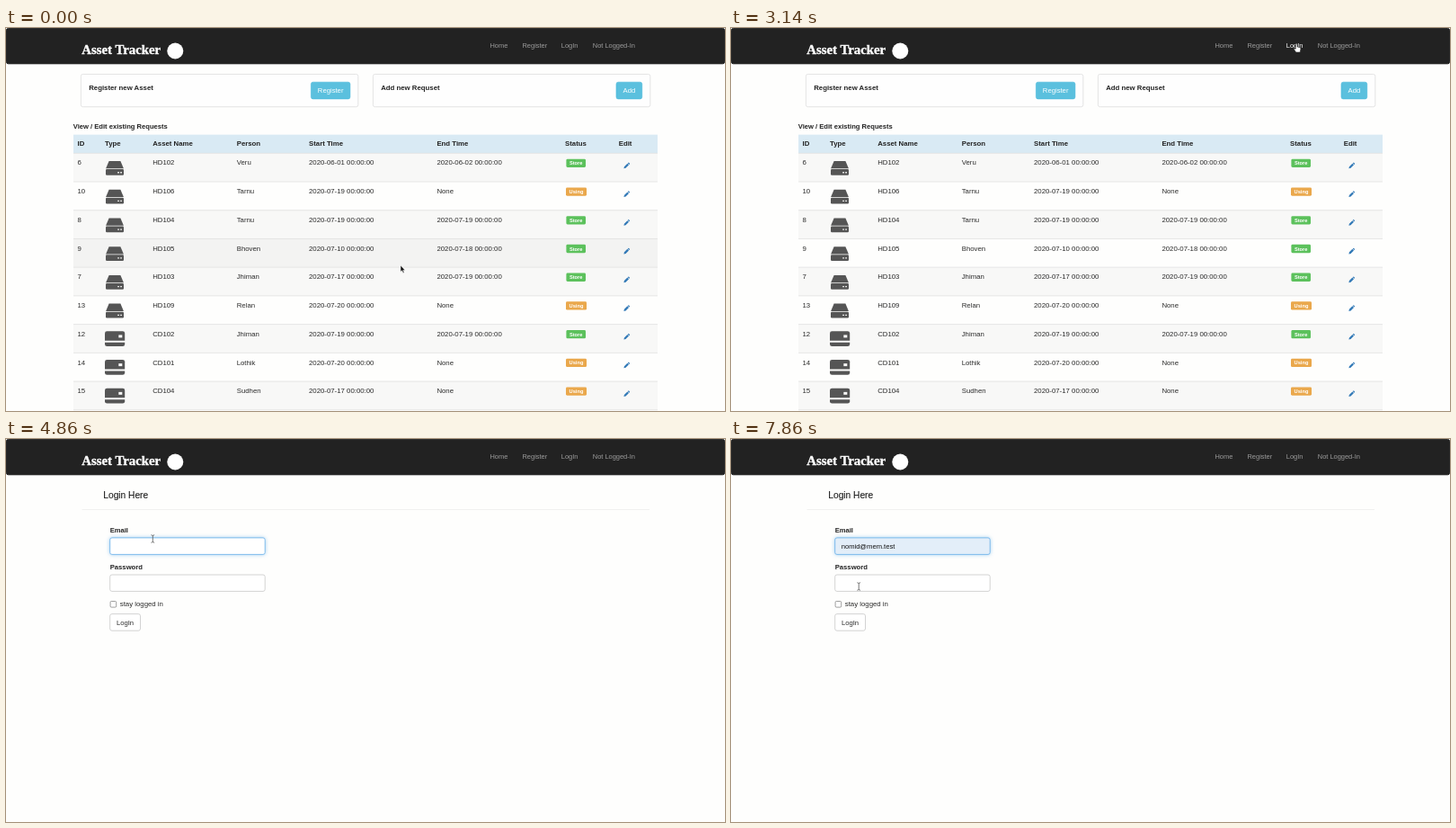
Animation, 800 px wide and 426 px high, one loop 8000 ms. Source, as an HTML page:

```html
<!DOCTYPE html>
<html lang="en">
<head>
<meta charset="utf-8">
<title>Asset Tracker</title>
<style>
  html, body { margin: 0; width: 100%; height: 100%; overflow: hidden; background: #fefefd; }
  svg { display: block; width: 100vw; height: 100vh; }
  text { font: 7.8px "Liberation Sans", Arial, sans-serif; fill: #2b2b2b; white-space: pre; }
  .bold { font-weight: 700; fill: #222; }
  .brand { font: 700 14.8px "Liberation Serif", "Noto Serif", serif; fill: #fff; stroke: #fff; stroke-width: .4; }
  .nav { font-size: 7.45px; fill: #9d9d9d; }
  .nav.on { fill: #fff; }
  .heading { font-size: 10.2px; fill: #222; stroke: #222; stroke-width: .15; }
  .badge { font-size: 5.7px; font-weight: 700; fill: #fff; text-anchor: middle; }
  .button { font-size: 7.7px; text-anchor: middle; }
  .light { fill: #fff; }
  .small { font-size: 7.6px; }
  .box { fill: #fefefe; stroke: #ddd; stroke-width: .8; }
  .input { fill: #fff; stroke: #c8c8c8; stroke-width: .8; }
  .input.focus { stroke: #66afe9; filter: drop-shadow(0 0 2px #66afe999); }
  .input.filled { fill: #e3eef9; }
  #typed { font-size: 7.6px; fill: #555; }
  #typed.filled { fill: #111; }
  .row { fill: #fefefd; }
  .row.odd { fill: #f8f8f7; }
  .row.hover { fill: #f3f3f2; }
</style>
</head>
<body>
<svg viewBox="0 0 800 426" preserveAspectRatio="none">
  <defs>
    <g id="hdd" fill="#555">
      <path d="M114.6 8.7h12.8l3.5 8.3h-19.8z"/>
      <rect x="111" y="17.8" width="20" height="6.7" rx="1.2"/>
      <path d="M124.2 20.8h1.7v1.3h-1.7zM127.2 20.8h1.7v1.3h-1.7z" fill="#f8f8f7"/>
    </g>
    <g id="card" fill="#555">
      <path d="M110 18.2v-8.2q0-2.4 2.4-2.4h17.4q2.4 0 2.4 2.4v8.2z"/>
      <path d="M110 20.2h22.2v2q0 2.2-2.4 2.2h-17.4q-2.4 0-2.4-2.2z"/>
      <rect x="125.3" y="11.8" width="4" height="3" fill="#f8f8f7"/>
    </g>
    <path id="pencil" d="M687.4 17l.5-2.1 3.5-3.5 1.6 1.6-3.5 3.5zM691.8 11l.5-.5q.4-.3.8 0l.8.8q.3.4 0 .8l-.5.5z" fill="#337ab7"/>
  </defs>
  <rect width="800" height="426" fill="#fefefd"/>
  <rect x=".4" y=".4" width="799.2" height="39.4" rx="2.2" fill="#222" stroke="#080808" stroke-width=".8"/>
  <text class="brand" x="84.3" y="29">Asset Tracker</text>
  <circle cx="188.3" cy="25.5" r="9" fill="#fff"/>
  <g id="nav"></g>
  <g id="list"></g>
  <g id="login">
    <text class="heading" x="108.3" y="65.8">Login Here</text>
    <path d="M84.5 78.5H716" stroke="#eee" stroke-width=".8"/>
    <text class="bold small" x="115.7" y="103.8">Email</text>
    <rect class="input" id="email" x="115.7" y="109.9" width="172.5" height="18.5" rx="2.2"/>
    <text id="typed" x="122.7" y="121.7"></text>
    <rect id="caret" y="114.5" width=".8" height="9.2" fill="#333"/>
    <text class="bold" style="font-size:7.7px" x="115.7" y="145.1">Password</text>
    <rect class="input" x="115.7" y="151" width="172.5" height="18.4" rx="2.2"/>
    <rect x="116.1" y="180.5" width="6.6" height="6.6" rx="1.2" fill="#fff" stroke="#767676" stroke-width=".7"/>
    <text x="126.8" y="186.4">stay logged in</text>
    <rect class="input" x="115.7" y="194.6" width="33.8" height="18.6" rx="2.2"/>
    <text class="button" x="132.5" y="206.7">LogIn</text>
  </g>
  <g id="cursor">
    <path class="arrow" d="M0 0v7.2l1.6-1.4 1.3 2.7 1.2-.6-1.3-2.5h2.2z" fill="#111" stroke="#fff" stroke-width=".5"/>
    <path class="hand" d="M-.9 .8q.9-1.3 1.8 0v3l3 .7q1 .3 .8 1.5l-.7 3.8h-4.6l-2.2-3.4q-.5-1.2 1.9-.4z" fill="#fff" stroke="#222" stroke-width=".6"/>
    <path class="beam" d="M-1.8-4.2q1.6 0 1.8 .9q.2-.9 1.8-.9M0-3.5v7M-1.8 4.2q1.6 0 1.8-.9q.2 .9 1.8 .9" fill="none" stroke="#555" stroke-width=".8"/>
  </g>
</svg>
<script>
const $ = id => document.getElementById(id);
const label = (x, y, words, cls = '') => `<text x="${x}" y="${y}" class="${cls}">${words}</text>`;
const rect = (x, y, w, h, rest) => `<rect x="${x}" y="${y}" width="${w}" height="${h}" ${rest}/>`;

const LOOP = 8000, TOP = 139.3, PITCH = 31.72;

$('nav').innerHTML = [[538.5, 'Home'], [574.5, 'Register'], [617.8, 'LogIn'], [652.8, 'Not Logged-In']]
  .map(([x, words]) => label(x, 22.4, words, 'nav')).join('');

const panel = (x, title, button, bx, bw) =>
  rect(x, 51.4, 308.4, 36.3, 'rx="2.2" class="box"') + label(x + 8.8, 68.5, title, 'bold') +
  rect(bx, 60.2, bw, 18.7, 'rx="2.2" fill="#5bc0de" stroke="#46b8da" stroke-width=".6"') +
  label(bx + bw / 2, 72.4, button, 'button light');

const columns = [[79.5, 'ID'], [110, 'Type'], [163.2, 'Asset Name'], [256.7, 'Person'],
  [337, 'Start Time'], [479.4, 'End Time'], [622, 'Status'], [681.7, 'Edit']];

// id, asset, person, start day, end day
const assets = `6 HD102 Veru 06-01 06-02
10 HD106 Tarnu 07-19 -
8 HD104 Tarnu 07-19 07-19
9 HD105 Bhoven 07-10 07-18
7 HD103 Jhiman 07-17 07-19
13 HD109 Relan 07-20 -
12 CD102 Jhiman 07-19 07-19
14 CD101 Lothik 07-20 -
15 CD104 Sudhen 07-17 -`.split('\n').map(line => line.split(' '));

const stamp = day => day === '-' ? 'None' : `2020-${day} 00:00:00`;

function assetRow([id, asset, person, start, end], i) {
  const using = end === '-';
  const cells = [[79.5, id], [163.2, asset], [256.7, person], [337, stamp(start)], [479.4, stamp(end)]];
  return `<g transform="translate(0 ${TOP + i * PITCH})">` +
    rect(75, 0, 650, PITCH, `class="row ${i % 2 ? '' : 'odd'}"`) +
    '<path d="M75 0H725" stroke="#ddd" stroke-width=".7"/>' +
    `<use href="#${asset.startsWith('HD') ? 'hdd' : 'card'}"/>` +
    cells.map(([x, words]) => label(x, 13.2, words)).join('') +
    rect(using ? 623 : 623.4, 6.4, using ? 23 : 21.6, 9.3, `rx="1.4" fill="${using ? '#eaa84c' : '#5cc15c'}"`) +
    label(using ? 634.5 : 634.2, 13.1, using ? 'Using' : 'Store', 'badge') +
    '<use href="#pencil"/></g>';
}

$('list').innerHTML =
  panel(83.4, 'Register new Asset', 'Register', 339.4, 43.5) +
  panel(408.4, 'Add new Requset', 'Add', 679, 28.7) +
  label(74.8, 111.7, 'View / Edit existing Requests', 'bold small') +
  rect(75, 118.6, 650, 20.7, 'fill="#d9eaf4"') +
  columns.map(([x, words]) => label(x, 131.2, words, 'bold')).join('') +
  assets.map(assetRow).join('') +
  '<path d="M75 424.8H725" stroke="#ddd" stroke-width=".7"/>';

// time, x, y, shape
const moves = [
  [0, 439, 264, 'arrow'], [140, 446, 254, 'arrow'], [290, 482, 205, 'arrow'], [430, 536, 140, 'arrow'],
  [570, 590, 80, 'arrow'], [710, 621, 42, 'arrow'], [860, 631, 20, 'hand'], [1000, 629.8, 17.2, 'hand'],
  [2860, 629.2, 17.2, 'hand'], [3290, 0, 0, 'none'], [3570, 420, 90, 'arrow'], [3710, 226, 104, 'arrow'],
  [3860, 163.3, 111, 'beam'], [5860, 163.3, 115, 'beam'], [6000, 163.3, 120, 'beam'],
  [6570, 162, 128, 'beam'], [6710, 160, 135, 'beam'], [7140, 158, 139, 'beam'], [7290, 154, 145, 'beam'],
  [7430, 149, 153, 'beam'], [7570, 145, 159, 'beam'], [7710, 143, 162, 'beam'], [7860, 142.2, 164, 'beam']
];
const mail = 'nomid@mem.test';
const typing = [[0, 0], [5290, 1], [5570, 2], [5710, 3], [5860, 4], [6570, 5], [6710, mail.length]];

const latest = (track, t) => track.findLast(step => step[0] <= t);
const between = (t, from, to) => t >= from && t < to;
const show = (el, on) => { el.style.display = on ? '' : 'none'; };

const rows = document.querySelectorAll('.row');
const loginLink = $('nav').children[2];

function draw(t) {
  const [, x, y, shape] = latest(moves, t);
  const onLogin = t >= 3290, filled = t >= 6710;
  show($('list'), !onLogin);
  show($('login'), onLogin);

  $('cursor').setAttribute('transform', `translate(${x} ${y})`);
  for (const path of $('cursor').children) show(path, path.classList.contains(shape));
  const over = Math.floor((y - TOP) / PITCH);
  rows.forEach((row, i) => row.classList.toggle('hover', i === over));
  loginLink.classList.toggle('on', between(t, 860, 3570));

  $('email').classList.toggle('focus', t >= 4430);
  $('email').classList.toggle('filled', filled);
  $('typed').classList.toggle('filled', filled);
  $('typed').textContent = mail.slice(0, latest(typing, t)[1]);
  const caretOn = between(t, 4430, 4860) || between(t, 5290, 6000);
  show($('caret'), caretOn);
  if (caretOn) $('caret').setAttribute('x', 122.7 + $('typed').getComputedTextLength());
}

const began = performance.now();
function tick() {
  draw((performance.now() - began) % LOOP);
  requestAnimationFrame(tick);
}
tick();
</script>
</body>
</html>
```
